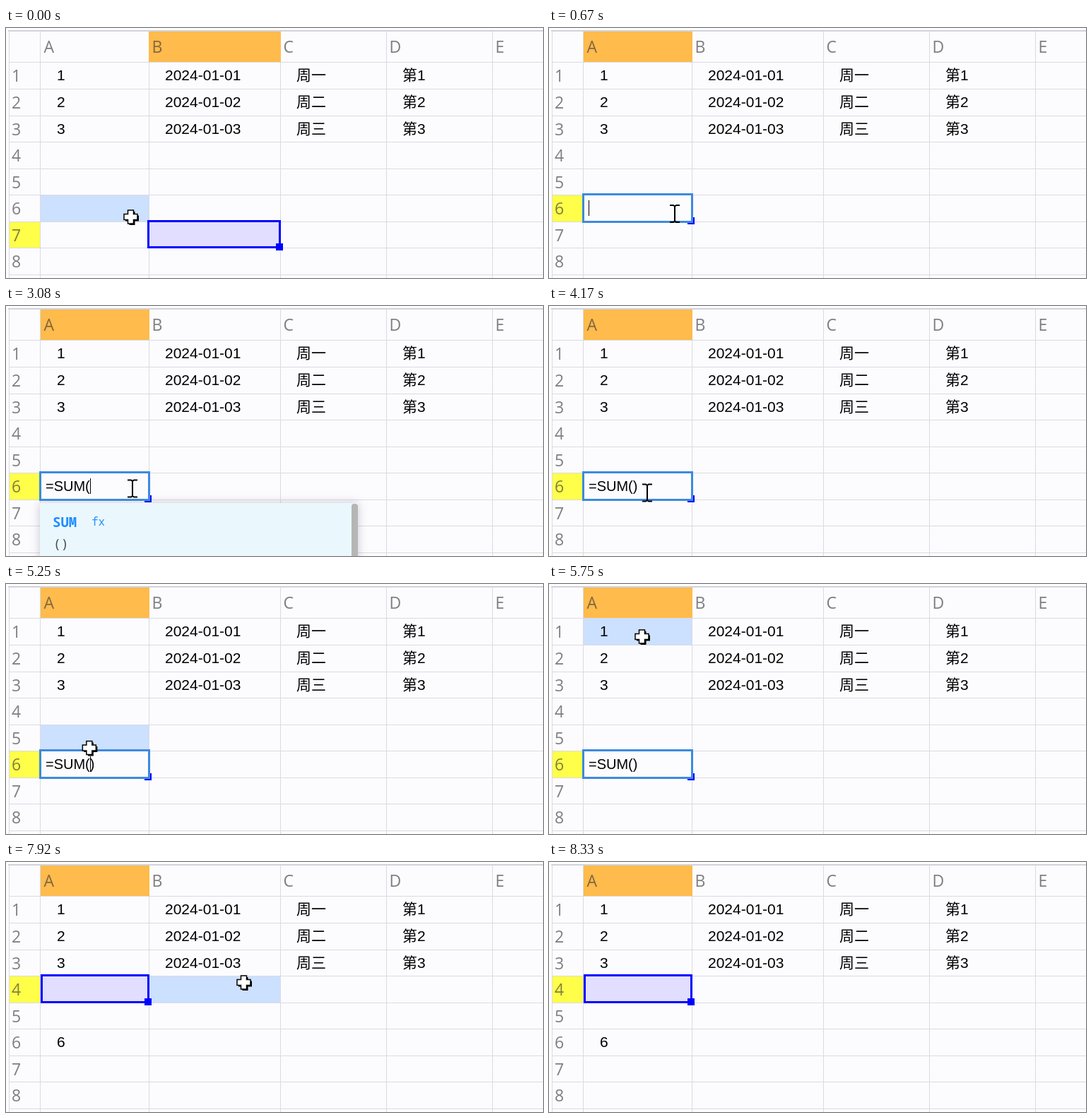
Animation of 760 by 354 pixels, one loop 8.91 s. Source, as an HTML page with a canvas:

```html
<!DOCTYPE html>
<html lang="zh">
<head>
<meta charset="utf-8">
<title>Spreadsheet formula entry</title>
<style>
  html, body { margin: 0; height: 100%; overflow: hidden; background: #fcfcff; }
  canvas { display: block; }
</style>
</head>
<body>
<canvas id="stage" width="760" height="354"></canvas>
<script>
const ctx = document.getElementById('stage').getContext('2d');
const LOOP = 8910;
const COLS = [49, 202, 388, 538, 688, 840];
const rowY = r => Math.round(48.4 + 37.55 * r);
const BLUE = '#0000ff', EDGE = '#3d8ade', GRID = '#d9dae3', PAPER = '#fcfcff';
const CELL_FONT = '21px "Liberation Sans", Arial, sans-serif';
const HEAD_FONT = '23px "Open Sans", "Noto Sans", sans-serif';
const CJK_FONT = '21px "Liberation Sans", "Noto Sans CJK SC", "Noto Sans CJK", sans-serif';
const MONO = '"Noto Sans Mono", "DejaVu Sans Mono", monospace';
const EDITOR = { x: 47, y: 234, w: 157, h: 42 };
const DAYS = ['一', '二', '三'];

// Pointer path: time, x, y
const PATH = [
  [0, 177, 268], [330, 178, 263], [920, 178, 263], [1170, 179, 258.5],
  [3920, 179, 258.5], [4170, 139, 264.5], [4420, 126, 266], [4830, 117, 263],
  [5080, 117, 263], [5330, 119, 218], [5750, 132, 75], [5920, 132, 76],
  [6000, 136, 91], [6330, 146, 141], [6500, 146, 141], [6750, 160, 146],
  [6830, 160, 146], [7000, 325, 173], [7830, 325, 173], [7920, 337, 171],
  [8250, 580, 345], [8330, 590, 390]
];
// Editor content: time, text
const TYPED = [
  [580, ''], [1580, '='], [2080, '=S'], [2250, '=SU'], [2500, '=SUM'], [3080, '=SUM('],
  [3330, '=SUM()'], [5920, '=SUM(A1)'], [6080, '=SUM(A1:A2)'], [6170, '=SUM(A1:A3)']
];
// Caret: time it restarts, text to its left
const CARETS = [
  ...TYPED.slice(0, 7), [4830, '=SUM('], [5920, '=SUM(A1'], [6080, '=SUM(A1:A3']
];

const latest = (list, t) => list.filter(e => e[0] <= t).pop();
const between = (t, a, b) => t >= a && t < b;

function stepTime(t) {
  const stamp = n => Math.round(n * 100 / 12) * 10;
  let n = Math.round(t * 0.012);
  if (stamp(n) > t) n--;
  return stamp(n);
}

function pointerAt(t) {
  const i = PATH.findIndex(p => p[0] > t);
  if (i < 0) return PATH[PATH.length - 1].slice(1);
  const [a, b] = [PATH[i - 1], PATH[i]];
  const k = (t - a[0]) / (b[0] - a[0]);
  return [a[1] + (b[1] - a[1]) * k, a[2] + (b[2] - a[2]) * k];
}

function box(x, y, w, h, color) {
  ctx.fillStyle = color;
  ctx.fillRect(x, y, w, h);
}

function text(str, x, y, font, color) {
  ctx.font = font;
  ctx.fillStyle = color;
  ctx.fillText(str, x, y);
}

function fillCell(c, r, color) {
  box(COLS[c], rowY(r), COLS[c + 1] - COLS[c], rowY(r + 1) - rowY(r), color);
}

function drawGrid() {
  for (let r = 0; r <= 8; r++) box(4, rowY(r), 756, 1, GRID);
  for (const x of [4, 48, ...COLS.slice(1, 5)]) box(x, 3, 1, 351, GRID);
  box(3, 3, 757, 2, '#d2d3da');
}

function drawLabels(shift) {
  const gray = 'rgba(60,60,60,.65)';
  [...'ABCDE'].forEach((s, i) => text(s, COLS[i] + 4.5, 35, HEAD_FONT, gray));
  for (let r = 0; r < 8; r++) text(r + 1, 8, rowY(r) + 28, HEAD_FONT, gray);
  for (let r = 0; r < 3; r++) {
    const y = rowY(r) + 26;
    text(r + 1, r < shift ? 60 : 72, y, CELL_FONT, '#000');
    text('2024-01-0' + (r + 1), 225, y, CELL_FONT, '#000');
    text('周' + DAYS[r], 411, y, CJK_FONT, '#000');
    text('第' + (r + 1), 561, y, CJK_FONT, '#000');
  }
}

function drawReference(rows) {
  ctx.strokeStyle = EDGE;
  ctx.lineWidth = 5;
  ctx.setLineDash([5, 4]);
  ctx.beginPath();
  for (let r = 1; r <= rows; r++) {
    ctx.moveTo(51, rowY(r) - 0.5);
    ctx.lineTo(200, rowY(r) - 0.5);
  }
  ctx.moveTo(200.5, 51);
  ctx.lineTo(200.5, rowY(rows) - 2);
  ctx.stroke();
  ctx.setLineDash([]);
}

function drawSelection(c, r0, r1, width) {
  const right = COLS[c + 1], bottom = rowY(r1 + 1);
  const inset = 1 - width / 2;
  const x = c ? COLS[c] + inset : COLS[c] + width / 2;
  const y = r0 ? rowY(r0) + inset : rowY(r0) + 1 + width / 2;
  ctx.strokeStyle = BLUE;
  ctx.lineWidth = width;
  ctx.strokeRect(x, y, right + inset - x, bottom + inset - y);
  box(right - 6, bottom - 6, 10, 10, BLUE);
}

function drawPopup(name) {
  ctx.save();
  ctx.shadowColor = 'rgba(120,120,130,.4)';
  ctx.shadowBlur = 12;
  box(48, 279, 450, 100, '#eaf8fe');
  ctx.restore();
  ctx.fillStyle = '#b6b6b6';
  ctx.beginPath();
  ctx.roundRect(489, 280, 9, 100, 4);
  ctx.fill();
  text(name, 66, 313, `bold 19px ${MONO}`, '#1e8cff');
  text('fx', 121, 311, `16px ${MONO}`, '#2a90ff');
  text('()', 67, 343, `18px ${MONO}`, '#4a4a4a');
}

function drawEditor(t) {
  const { x, y, w, h } = EDITOR;
  const font = '20px "Liberation Sans", Arial, sans-serif';
  box(x, y, w, h, EDGE);
  box(x + 3, y + 3, w - 6, h - 6, PAPER);
  text(latest(TYPED, t)[1], 56, 262, font, '#000');
  const [since, left] = latest(CARETS, t);
  if ((t - since) % 1000 < 500) {
    ctx.font = font;
    box(Math.round(56 + ctx.measureText(left).width), 244, 1, 22, '#000');
  }
}

function crossPath(x, y) {
  ctx.beginPath();
  for (let i = 0; i < 4; i++) {
    const c = [1, 0, -1, 0][i], s = [0, 1, 0, -1][i];
    for (const [u, v] of [[4, -4], [9.5, -4], [9.5, 4]])
      ctx.lineTo(x + u * c - v * s, y + u * s + v * c);
  }
  ctx.closePath();
}

function drawCross(x, y) {
  ctx.fillStyle = ctx.strokeStyle = '#000';
  ctx.lineWidth = 1.5;
  crossPath(x + 1.5, y + 1.5);
  ctx.fill();
  crossPath(x - 0.5, y - 0.5);
  ctx.fillStyle = '#fff';
  ctx.fill();
  ctx.stroke();
}

function drawBeam(x, y) {
  ctx.strokeStyle = '#000';
  ctx.lineWidth = 2;
  ctx.beginPath();
  for (const s of [-1, 1]) {
    ctx.moveTo(x - 7, y + 12 * s);
    ctx.lineTo(x - 2, y + 12 * s);
    ctx.lineTo(x, y + 10.5 * s);
    ctx.lineTo(x + 2, y + 12 * s);
    ctx.lineTo(x + 7, y + 12 * s);
  }
  ctx.moveTo(x, y - 11);
  ctx.lineTo(x, y + 11);
  ctx.stroke();
}

function render(t) {
  const [px, py] = pointerAt(t);
  const editing = between(t, 580, 7250);
  const refRows = between(t, 5920, 7250) ? (t < 6080 ? 1 : t < 6170 ? 2 : 3) : 0;
  const col = t < 250 ? 1 : 0;
  const first = t < 250 ? 6 : refRows ? 0 : t < 7250 ? 5 : 3;
  const last = refRows ? refRows - 1 : first;
  const overEditor = editing && px > EDITOR.x && px < EDITOR.x + EDITOR.w
    && py > EDITOR.y && py < EDITOR.y + EDITOR.h;

  box(0, 0, 760, 354, PAPER);
  for (let r = first; r <= last; r++) {
    box(4, rowY(r), 45, rowY(r + 1) - rowY(r), '#ffff4a');
    fillCell(col, r, refRows && !r ? '#b2caff' : '#e1deff');
  }
  if (!overEditor) {
    const c = COLS.findIndex(x => x > px) - 1;
    const r = Math.floor((py - 48) / 37.6);
    if (c !== col || r < first || r > last) fillCell(c, r, '#cce0ff');
  }

  drawGrid();
  box(COLS[col], 5, COLS[col + 1] - COLS[col] + 1, 43, '#ffbb4c');
  if (refRows) drawReference(refRows);
  drawLabels(refRows);
  drawSelection(col, first, last, refRows ? 2 : 3);
  if (t >= 7250) text('6', 72, 262, CELL_FONT, '#000');
  if (between(t, 1580, 3170)) drawPopup(t < 2170 ? 'ABS' : 'SUM');
  if (editing) drawEditor(t);
  if (overEditor && t >= 670) drawBeam(px, py);
  else drawCross(px, py);
}

function loop() {
  render(stepTime(performance.now() % LOOP));
  requestAnimationFrame(loop);
}
loop();
</script>
</body>
</html>
```
